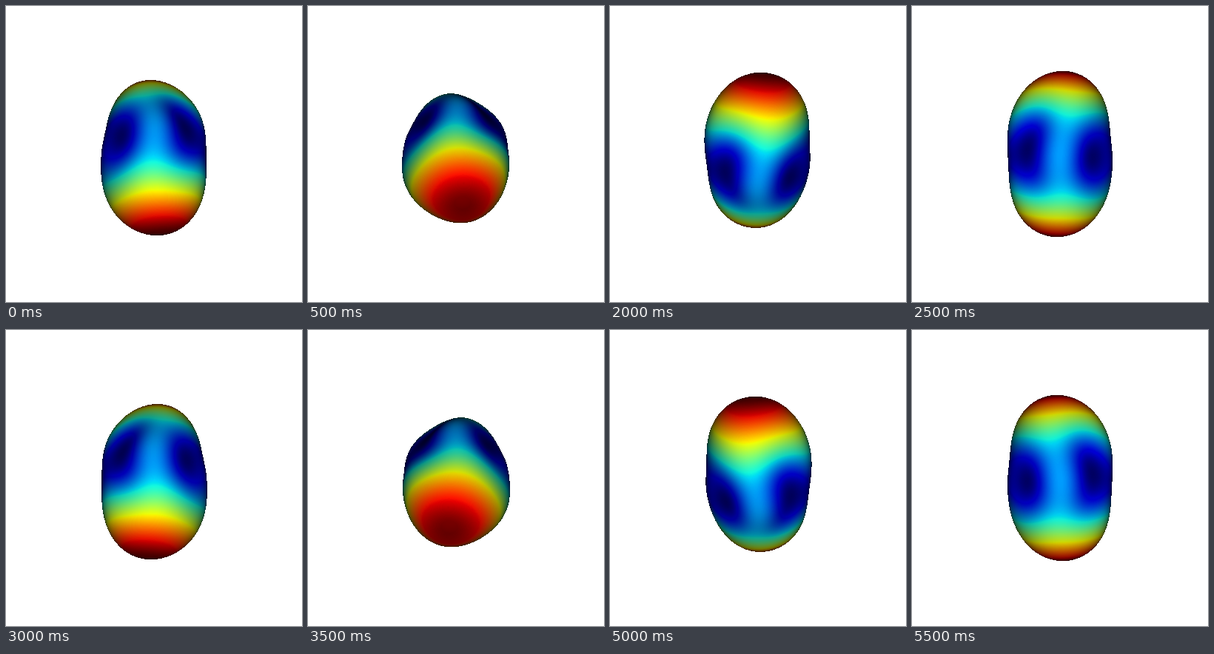
Recreate the animation shown at these times as a matplotlib script. Size 400x400 px, loop 6000 ms.

```python
import numpy as np
import matplotlib.pyplot as plt
from matplotlib.animation import FuncAnimation

SIZE = 400
FRAMES, INTERVAL = 12, 500
R_MIN, R_MAX = 66.0, 111.0   # radius range in pixels
CAMERA = 560.0               # distance from the camera to the centre
X0, X1, Y0, Y1 = 118, 282, 82, 318   # window that always holds the body


def level(x, y, z):
    """Radius on a 0..1 scale for a direction: a sum of even harmonics."""
    w = z + 1j * x
    w2 = w * w
    w3, w4 = w2 * w, w2 * w2
    y2 = y * y
    return (0.10 + y2 * (0.45 + y2 * (0.65 - 0.20 * y2))
            + (0.05 - 0.15 * y2) * w2.real
            + 0.085 * w4.real
            + 0.045 * (w3 * w3).real
            + 0.15 * x * y * y2
            + 0.10 * y * w3.imag
            + 0.23 * y2 * w4.imag)


def to_body(p, angle):
    """Undo the tumble about the horizontal axis."""
    x, up, depth = p
    c, s = np.cos(angle), np.sin(angle)
    return np.array([x, up * c - depth * s, up * s + depth * c])


def distance(p, angle):
    """Signed gap between a point and the surface along its radius."""
    q = to_body(p, angle)
    r = np.sqrt((q * q).sum(axis=0))
    return r - R_MIN - (R_MAX - R_MIN) * level(*(q / r))


def view_rays():
    px = np.arange(X0, X1) + 0.5 - SIZE / 2
    py = SIZE / 2 - np.arange(Y0, Y1) - 0.5
    gx, gy = np.meshgrid(px, py)
    return np.array([gx.ravel(), gy.ravel(), np.full(gx.size, -CAMERA)])


def trace(rays, angle):
    """Return the visible surface points and the mask of rays that hit."""
    eye = np.array([[0.0], [0.0], [CAMERA]])
    reach = 118 / CAMERA
    steps, width = np.linspace(1 - reach, 1 + reach, 48, retstep=True)
    first = np.full(rays.shape[1], np.nan)
    for t in steps:
        open_rays = np.flatnonzero(np.isnan(first))
        inside = distance(eye + t * rays[:, open_rays], angle) < 0
        first[open_rays[inside]] = t

    hit = ~np.isnan(first)
    rays, far = rays[:, hit], first[hit]
    near = far - width
    for _ in range(12):
        mid = (near + far) / 2
        inside = distance(eye + mid * rays, angle) < 0
        far = np.where(inside, mid, far)
        near = np.where(inside, near, mid)
    return eye + far * rays, hit


def facing(p, angle, h=0.5):
    """Headlight term: depth component of the unit surface normal."""
    grad = np.array([distance(p + h * axis[:, None], angle)
                     - distance(p - h * axis[:, None], angle)
                     for axis in np.eye(3)])
    return np.clip(grad[2] / np.sqrt((grad * grad).sum(axis=0)), 0, 1)


def render(k):
    angle = np.radians(360 / FRAMES * (k - 5))
    p, hit = trace(rays, angle)
    q = to_body(p, angle)
    q = q / np.sqrt((q * q).sum(axis=0))
    color = plt.cm.jet(np.clip(level(*q), 0, 1))[:, :3]
    window = np.ones((hit.size, 3))
    window[hit] = color * facing(p, angle)[:, None]
    picture = np.ones((SIZE, SIZE, 3))
    picture[Y0:Y1, X0:X1] = window.reshape(Y1 - Y0, X1 - X0, 3)
    return picture


rays = view_rays()
pictures = [render(k) for k in range(FRAMES)]

fig = plt.figure(figsize=(4, 4), dpi=100, facecolor="white")
ax = fig.add_axes([0, 0, 1, 1])
ax.axis("off")
image = ax.imshow(pictures[0], interpolation="nearest", aspect="auto")


def update(k):
    image.set_data(pictures[k])
    return (image,)


anim = FuncAnimation(fig, update, frames=FRAMES, interval=INTERVAL,
                     repeat=True, repeat_delay=0)
plt.show()
```
